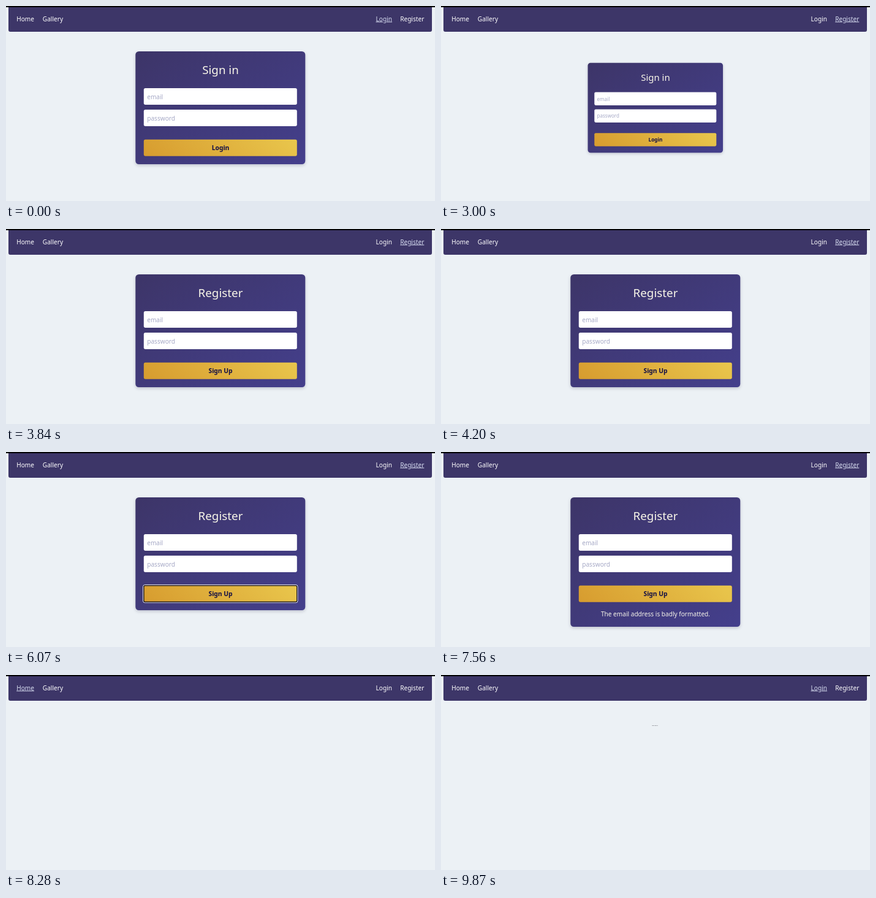
Recreate the animation shown at these times as an HTML page. Size 700 px wide and 318 px high, loop 9990 ms.

```html
<!DOCTYPE html>
<html lang="en">
<head>
<meta charset="utf-8">
<title>Sign in and register</title>
<style>
  html, body { margin: 0; width: 100%; height: 100%; overflow: hidden; background: #ecf1f5; }
  svg { display: block; width: 700px; height: 318px; }
  text { font: 10.1px "Noto Sans", "Open Sans", sans-serif; fill: #fff; }
  .mid { text-anchor: middle; }
  .end { text-anchor: end; }
  .on { text-decoration: underline; fill: #d6dcf0; }
  #title { font-size: 18.8px; fill: #f8f6e8; }
  .hint { fill: #a6a9c6; }
  #action { font-size: 10.3px; font-weight: 700; fill: #120e46; }
  #error { fill: #f8f6ea; }
  #hello { font-size: 11px; fill: #33333b; }
  #panel { filter: drop-shadow(0 2.5px 2.5px rgba(30, 30, 70, .22)); }
</style>
</head>
<body>
<svg viewBox="0 0 700 318">
  <defs>
    <linearGradient id="violet" x1="0" y1="0" x2="1" y2="1">
      <stop offset="0" stop-color="#3d3568"/>
      <stop offset="1" stop-color="#443f8c"/>
    </linearGradient>
    <linearGradient id="gold" gradientUnits="userSpaceOnUse" x1="281" y1="300" x2="419" y2="163">
      <stop offset="0" stop-color="#d79c2f"/>
      <stop offset="1" stop-color="#e9c64c"/>
    </linearGradient>
  </defs>

  <rect width="700" height="318" fill="#ecf1f5"/>
  <path d="M4 0H695V39Q695 42 692 42H7Q4 42 4 39Z" fill="#3d3668"/>
  <rect width="700" height="2" fill="#000"/>
  <g id="nav">
    <text x="17.2" y="24.5">Home</text>
    <text x="59.8" y="24.5">Gallery</text>
    <text x="630" y="24.5" class="end">Login</text>
    <text x="682.3" y="24.5" class="end">Register</text>
  </g>

  <g id="card">
    <rect id="panel" x="211.3" y="74" width="277" height="184" rx="5.5" fill="url(#violet)"/>
    <text id="title" class="mid" x="350" y="110.7"></text>
    <rect x="224.8" y="134" width="250" height="27" rx="2.7" fill="#fff"/>
    <text class="hint" x="230.2" y="151.6">email</text>
    <rect x="224.8" y="169" width="250" height="27" rx="2.7" fill="#fff"/>
    <text class="hint" x="230.2" y="186.6">password</text>
    <rect x="224.8" y="217.7" width="250" height="27" rx="2.7" fill="url(#gold)"/>
    <g id="ring" fill="none">
      <rect x="223.7" y="216.7" width="252.2" height="29" rx="2.8" stroke="#fff"/>
      <rect x="224.9" y="217.9" width="249.8" height="26.6" rx="2" stroke="#15131c" stroke-width="1.3"/>
    </g>
    <text id="action" class="mid" x="350" y="235.2"></text>
    <text id="error" class="mid" x="350" y="267.6">The email address is badly formatted.</text>
  </g>

  <text id="hello" class="mid" x="343" y="86.4">Hello world!</text>
</svg>
<script>
  const LOOP = 9990;
  const $ = id => document.getElementById(id);
  const links = [...$("nav").children];

  // Each track holds its value until the next [time, value].
  const tracks = {
    link: [[0, "Login"], [3000, "Register"], [7680, "Home"], [9630, "Login"]],
    card: [
      [0, 1], [3000, .796], [3120, .45], [3240, .16], [3360, .03], [3480, 0],
      [3720, .62], [3840, 1],
      [7800, .796], [7920, .45], [8040, .16], [8160, .03], [8280, 0]
    ],
    hello: [[0, 0], [8640, .3], [8760, .75], [8880, 1], [9750, .6], [9870, .16]],
    form: [[0, ["Sign in", "Login"]], [3600, ["Register", "Sign Up"]]],
    ring: [[0, false], [6070, true], [7560, false]],
    error: [[0, false], [6190, true]]
  };

  const at = (name, t) => tracks[name].findLast(step => step[0] <= t)[1];
  const show = (id, on) => $(id).setAttribute("visibility", on ? "visible" : "hidden");

  function zoom(id, s, x, y) {
    $(id).style.display = s ? "" : "none";
    $(id).setAttribute("transform", `translate(${x} ${y}) scale(${s}) translate(${-x} ${-y})`);
  }

  function draw(t) {
    const link = at("link", t);
    links.forEach(el => el.classList.toggle("on", el.textContent === link));

    const [title, action] = at("form", t);
    $("title").textContent = title;
    $("action").textContent = action;

    const error = at("error", t);
    const height = error ? 211 : 184;
    $("panel").setAttribute("height", height);
    show("error", error);
    show("ring", at("ring", t));

    zoom("card", at("card", t), 349.8, 74 + height / 2);
    zoom("hello", at("hello", t), 350, 82.3);
  }

  const start = performance.now();
  function tick() {
    draw((performance.now() - start) % LOOP);
    requestAnimationFrame(tick);
  }
  tick();
</script>
</body>
</html>
```
